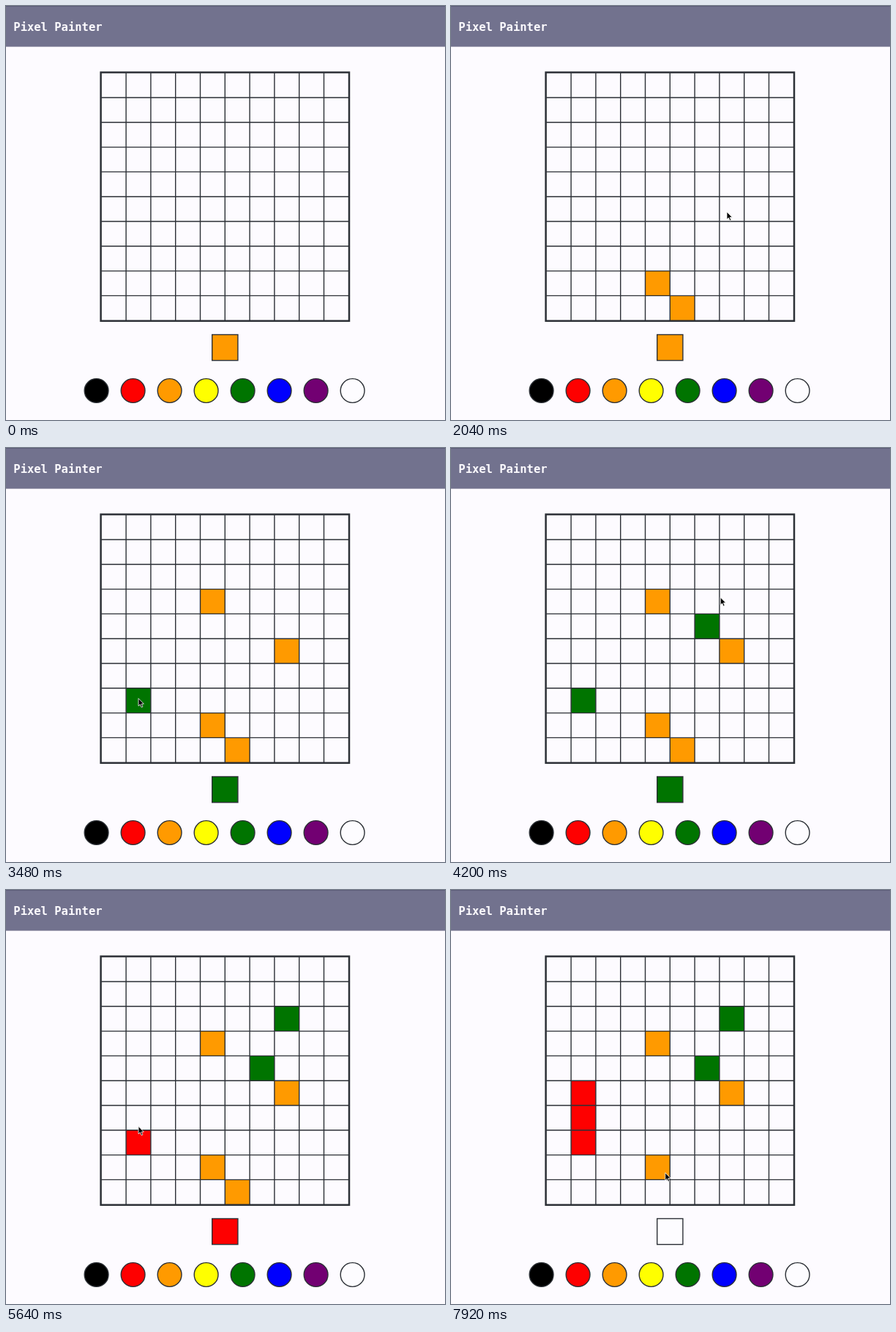
An HTML page for the animation above (8 s loop, 600 by 565 pixels).

```html
<!DOCTYPE html>
<html lang="en">
<head>
<meta charset="utf-8">
<title>Pixel Painter</title>
<style>
html, body { margin: 0; width: 100%; height: 100%; overflow: hidden; background: #fdfbff; }
svg { display: block; width: 600px; height: 565px; }
.ink { stroke: #2c3036; stroke-width: 1.4; }
.title { font: bold 15.5px "DejaVu Sans Mono", "Liberation Mono", monospace; fill: #fdfbff; }
</style>
</head>
<body>
<svg id="stage" viewBox="0 0 600 565">
  <rect width="600" height="565" fill="#fdfbff"/>
  <rect width="600" height="55.6" fill="#72728e"/>
  <rect width="600" height="1" fill="#5c5c78"/>
  <text class="title" x="10.3" y="34.3">Pixel Painter</text>
</svg>
<script>
const LOOP = 8000, STEP = 120;
const LEFT = 130.3, TOP = 91.2, CELL = 33.8, COUNT = 10, SIZE = CELL * COUNT;
const COLORS = {
  black: '#000', red: '#fe0000', orange: '#ff9a00', yellow: '#ffff00',
  green: '#007400', blue: '#0000fe', purple: '#720072', white: '#fdfcff'
};
const NAMES = Object.keys(COLORS);

const stage = document.getElementById('stage');

function add(tag, attrs) {
  const el = document.createElementNS('http://www.w3.org/2000/svg', tag);
  for (const key in attrs) el.setAttribute(key, attrs[key]);
  return stage.appendChild(el);
}

const paletteX = name => 123.6 + 50 * NAMES.indexOf(name);

const pick = (at, name) => ({ at, name, x: paletteX(name), y: 525 });

const paint = (at, col, row) => ({
  at, cell: row * COUNT + col,
  x: LEFT + (col + 0.5) * CELL, y: TOP + (row + 0.5) * CELL - 3
});

// Everything on screen follows from these clicks; a repeated one is a pause.
const CLICKS = [
  { at: 600, x: 563, y: 330 },
  paint(1200, 5, 9), paint(1560, 4, 8), paint(2160, 7, 5), paint(2640, 4, 3),
  pick(3000, 'green'),
  paint(3480, 1, 7), paint(3840, 6, 4), paint(3960, 6, 4), paint(4440, 7, 2),
  pick(4950, 'red'),
  paint(5520, 1, 7), paint(5880, 1, 5), paint(6360, 1, 6), paint(6840, 1, 6),
  pick(7440, 'white'),
  paint(7800, 5, 9), paint(8000, 4, 8)
];

const cells = Array.from({ length: COUNT * COUNT }, (_, i) => add('rect', {
  x: LEFT + (i % COUNT) * CELL, y: TOP + Math.floor(i / COUNT) * CELL,
  width: CELL, height: CELL
}));

for (let i = 1; i < COUNT; i++) {
  const x = LEFT + i * CELL, y = TOP + i * CELL;
  add('path', { class: 'ink', d: `M${x} ${TOP}v${SIZE}M${LEFT} ${y}h${SIZE}` });
}
add('rect', {
  x: 129.6, y: 90.6, width: 339.4, height: 339.2,
  fill: 'none', stroke: '#2c3036', 'stroke-width': 2.5
});

const swatch = add('rect', { class: 'ink', x: 281.7, y: 448.5, width: 35.2, height: 35.2 });
for (const name of NAMES) {
  add('circle', { class: 'ink', cx: paletteX(name), cy: 525, r: 16.4, fill: COLORS[name] });
}

const pointer = add('path', {
  d: 'M0 0V10.4L2.4 8.2L4.1 12.2L5.9 11.4L4.2 7.5H7.4Z',
  fill: '#000', stroke: '#fff', 'stroke-width': 0.8, 'stroke-linejoin': 'round'
});

// Glide from one click to the next, arriving just before the press.
function pointAt(t) {
  const i = CLICKS.findIndex(c => c.at > t);
  const a = CLICKS[i - 1], b = CLICKS[i];
  const k = Math.min(1, (t - a.at) / (b.at - a.at) / 0.95);
  const e = k * k * (3 - 2 * k);
  return [a.x + (b.x - a.x) * e, a.y + (b.y - a.y) * e];
}

function draw(time) {
  const t = Math.floor((time % LOOP) / STEP) * STEP;
  const board = [];
  let color = COLORS.orange;
  for (const click of CLICKS) {
    if (click.at > t) break;
    if (click.name) color = COLORS[click.name];
    else if (click.cell !== undefined) board[click.cell] = color;
  }
  cells.forEach((cell, i) => cell.setAttribute('fill', board[i] || 'none'));
  swatch.setAttribute('fill', color);

  const shown = t >= CLICKS[0].at;
  pointer.setAttribute('visibility', shown ? 'visible' : 'hidden');
  if (shown) pointer.setAttribute('transform', `translate(${pointAt(t)})`);
}

const start = performance.now();
function tick() {
  draw(performance.now() - start);
  requestAnimationFrame(tick);
}
tick();
</script>
</body>
</html>
```
